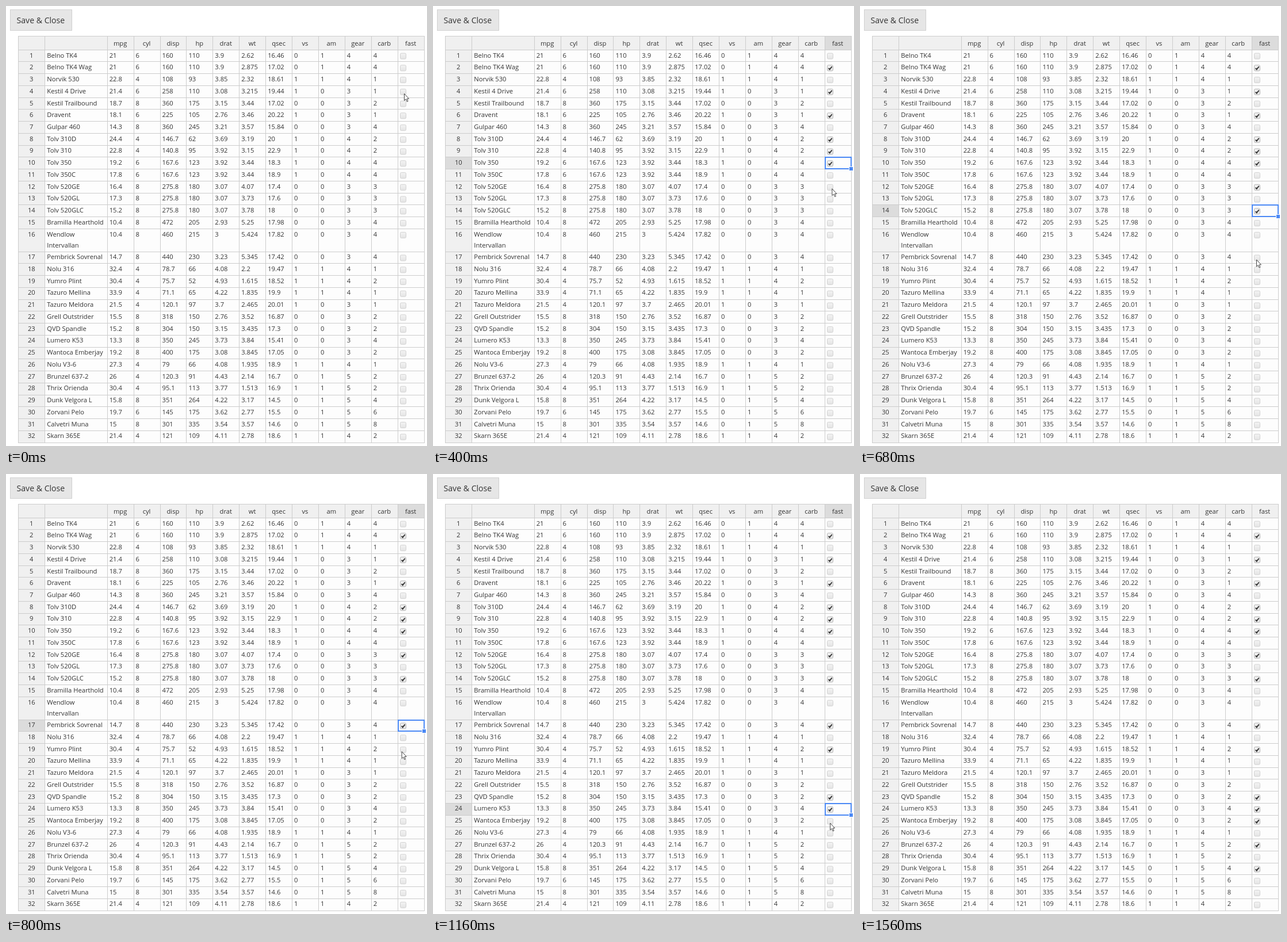
An HTML page with a canvas for the animation above (1640 ms loop, 732 by 765 pixels).

```html
<!DOCTYPE html>
<html lang="en">
<head>
<meta charset="utf-8">
<title>Editable table</title>
<style>
html, body { margin: 0; width: 100%; height: 100%; overflow: hidden; background: #fff; }
body { color: #333; font: 11.2px/18.9px "Open Sans", "Noto Sans", sans-serif; white-space: nowrap; }
canvas, table, .button { position: absolute; left: 0; top: 0; }
.button {
  left: 7px; top: 6px; width: 95.5px; height: 35px; padding-left: 10.5px;
  border: 1px solid #d0d0d0; background: #e6e6e6; font-size: 14.1px; line-height: 35px;
}
table { left: 21.3px; top: 52px; }
table, thead, tbody { display: block; }
tr { display: grid; grid-template-columns: 46px 108.4px repeat(12, 45.92px); }
thead tr { height: 23.7px; line-height: 25.3px; }
th { padding: 0; font-weight: normal; text-align: center; }
td { padding: .9px 0 .95px 4px; }
tbody tr { counter-increment: row; }
tbody tr::before { content: counter(row); padding-top: .9px; text-align: center; }
</style>
</head>
<body>
<canvas id="stage" width="732" height="765"></canvas>
<div class="button">Save &amp; Close</div>
<table>
<thead>
<tr><th><th><th>mpg<th>cyl<th>disp<th>hp<th>drat<th>wt<th>qsec<th>vs<th>am<th>gear<th>carb<th>fast
</thead>
<tbody>
<tr><td>Belno TK4<td>21<td>6<td>160<td>110<td>3.9<td>2.62<td>16.46<td>0<td>1<td>4<td>4
<tr><td>Belno TK4 Wag<td>21<td>6<td>160<td>110<td>3.9<td>2.875<td>17.02<td>0<td>1<td>4<td>4
<tr><td>Norvik 530<td>22.8<td>4<td>108<td>93<td>3.85<td>2.32<td>18.61<td>1<td>1<td>4<td>1
<tr><td>Kestil 4 Drive<td>21.4<td>6<td>258<td>110<td>3.08<td>3.215<td>19.44<td>1<td>0<td>3<td>1
<tr><td>Kestil Trailbound<td>18.7<td>8<td>360<td>175<td>3.15<td>3.44<td>17.02<td>0<td>0<td>3<td>2
<tr><td>Dravent<td>18.1<td>6<td>225<td>105<td>2.76<td>3.46<td>20.22<td>1<td>0<td>3<td>1
<tr><td>Gulpar 460<td>14.3<td>8<td>360<td>245<td>3.21<td>3.57<td>15.84<td>0<td>0<td>3<td>4
<tr><td>Tolv 310D<td>24.4<td>4<td>146.7<td>62<td>3.69<td>3.19<td>20<td>1<td>0<td>4<td>2
<tr><td>Tolv 310<td>22.8<td>4<td>140.8<td>95<td>3.92<td>3.15<td>22.9<td>1<td>0<td>4<td>2
<tr><td>Tolv 350<td>19.2<td>6<td>167.6<td>123<td>3.92<td>3.44<td>18.3<td>1<td>0<td>4<td>4
<tr><td>Tolv 350C<td>17.8<td>6<td>167.6<td>123<td>3.92<td>3.44<td>18.9<td>1<td>0<td>4<td>4
<tr><td>Tolv 520GE<td>16.4<td>8<td>275.8<td>180<td>3.07<td>4.07<td>17.4<td>0<td>0<td>3<td>3
<tr><td>Tolv 520GL<td>17.3<td>8<td>275.8<td>180<td>3.07<td>3.73<td>17.6<td>0<td>0<td>3<td>3
<tr><td>Tolv 520GLC<td>15.2<td>8<td>275.8<td>180<td>3.07<td>3.78<td>18<td>0<td>0<td>3<td>3
<tr><td>Bramilla Hearthold<td>10.4<td>8<td>472<td>205<td>2.93<td>5.25<td>17.98<td>0<td>0<td>3<td>4
<tr><td>Wendlow<br>Intervallan<td>10.4<td>8<td>460<td>215<td>3<td>5.424<td>17.82<td>0<td>0<td>3<td>4
<tr><td>Pembrick Sovrenal<td>14.7<td>8<td>440<td>230<td>3.23<td>5.345<td>17.42<td>0<td>0<td>3<td>4
<tr><td>Nolu 316<td>32.4<td>4<td>78.7<td>66<td>4.08<td>2.2<td>19.47<td>1<td>1<td>4<td>1
<tr><td>Yumro Plint<td>30.4<td>4<td>75.7<td>52<td>4.93<td>1.615<td>18.52<td>1<td>1<td>4<td>2
<tr><td>Tazuro Mellina<td>33.9<td>4<td>71.1<td>65<td>4.22<td>1.835<td>19.9<td>1<td>1<td>4<td>1
<tr><td>Tazuro Meldora<td>21.5<td>4<td>120.1<td>97<td>3.7<td>2.465<td>20.01<td>1<td>0<td>3<td>1
<tr><td>Grell Outstrider<td>15.5<td>8<td>318<td>150<td>2.76<td>3.52<td>16.87<td>0<td>0<td>3<td>2
<tr><td>QVD Spandle<td>15.2<td>8<td>304<td>150<td>3.15<td>3.435<td>17.3<td>0<td>0<td>3<td>2
<tr><td>Lumero K53<td>13.3<td>8<td>350<td>245<td>3.73<td>3.84<td>15.41<td>0<td>0<td>3<td>4
<tr><td>Wantoca Emberjay<td>19.2<td>8<td>400<td>175<td>3.08<td>3.845<td>17.05<td>0<td>0<td>3<td>2
<tr><td>Nolu V3-6<td>27.3<td>4<td>79<td>66<td>4.08<td>1.935<td>18.9<td>1<td>1<td>4<td>1
<tr><td>Brunzel 637-2<td>26<td>4<td>120.3<td>91<td>4.43<td>2.14<td>16.7<td>0<td>1<td>5<td>2
<tr><td>Thrix Orienda<td>30.4<td>4<td>95.1<td>113<td>3.77<td>1.513<td>16.9<td>1<td>1<td>5<td>2
<tr><td>Dunk Velgora L<td>15.8<td>8<td>351<td>264<td>4.22<td>3.17<td>14.5<td>0<td>1<td>5<td>4
<tr><td>Zorvani Pelo<td>19.7<td>6<td>145<td>175<td>3.62<td>2.77<td>15.5<td>0<td>1<td>5<td>6
<tr><td>Calvetri Muna<td>15<td>8<td>301<td>335<td>3.54<td>3.57<td>14.6<td>0<td>1<td>5<td>8
<tr><td>Skarn 365E<td>21.4<td>4<td>121<td>109<td>4.11<td>2.78<td>18.6<td>1<td>1<td>4<td>2
</tbody>
</table>
<script>
const ctx = document.getElementById('stage').getContext('2d');
const LOOP = 1640, STEP = 40, DESELECT = 1560;
const ROWS = 32, COLUMNS = 12, TALL_ROW = 16;

// Table geometry
const LEFT = 21, NAME = 67, TOP = 52, BODY = 75.7, ROW = 20.75, WRAP = 18.9;
const colX = k => Math.round(175.7 + 45.92 * k);
const rowY = n => BODY + (n - 1) * ROW + (n > TALL_ROW ? WRAP : 0);
const lineY = n => Math.round(rowY(n));
const RIGHT = colX(COLUMNS), BOTTOM = lineY(ROWS + 1), FAST = colX(COLUMNS - 1);

// Rows ticked from top to bottom, at a slowly falling pace
const tickedRows = [2, 4, 6, 8, 9, 10, 12, 14, 17, 19, 23, 24, 25, 27, 29];
const stops = [{ row: 4, time: 0 },
  ...tickedRows.map(row => ({ row, time: 30 * row + 0.72 * row * row }))];

function rect(x, y, x2, y2, color) {
  ctx.fillStyle = color;
  ctx.fillRect(x, y, x2 - x, y2 - y);
}

function drawGrid(selected) {
  const head = Math.round(BODY), line = '#ccc';
  rect(LEFT, TOP, RIGHT, BOTTOM, '#fdfdfd');
  rect(LEFT, TOP, RIGHT, head, '#f0f0f0');
  rect(LEFT, TOP, NAME, BOTTOM, '#f0f0f0');
  if (selected) {
    rect(FAST, TOP, RIGHT, head, '#dcdcdc');
    rect(LEFT, lineY(selected), NAME, lineY(selected + 1), '#dcdcdc');
  }
  const vertical = x => rect(x, TOP, x + 1, BOTTOM + 1, line);
  const horizontal = y => rect(LEFT, y, RIGHT + 1, y + 1, line);
  vertical(LEFT);
  vertical(NAME);
  for (let k = 0; k <= COLUMNS; k++) vertical(colX(k));
  horizontal(TOP);
  for (let n = 1; n <= ROWS + 1; n++) horizontal(lineY(n));
}

function drawCheckbox(n, checked) {
  ctx.save();
  ctx.translate(685.5, rowY(n) + 6.4);
  const fill = ctx.createLinearGradient(0, 0, 0, 10);
  fill.addColorStop(0, '#f3f3f3');
  fill.addColorStop(1, '#e4e4e4');
  ctx.beginPath();
  ctx.roundRect(0, 0, 10, 10, 2);
  ctx.fillStyle = fill;
  ctx.fill();
  ctx.strokeStyle = checked ? '#b4b4b4' : '#d2d2d2';
  ctx.stroke();
  if (checked) {
    ctx.lineWidth = 2;
    ctx.strokeStyle = '#333';
    ctx.stroke(new Path2D('M2.2 5.2L4.2 7.4L8.2 2.4'));
  }
  ctx.restore();
}

function drawSelection(n) {
  const y = lineY(n) + 1, y2 = lineY(n + 1), blue = '#4b89f5';
  ctx.lineWidth = 2;
  ctx.strokeStyle = blue;
  ctx.strokeRect(FAST + 1, y, RIGHT - FAST - 1, y2 - y);
  rect(RIGHT - 4, y2 - 4, RIGHT + 4, y2 + 4, '#fff');
  rect(RIGHT - 3, y2 - 3, RIGHT + 3, y2 + 3, blue);
}

// The pointer darts to the next row, rests there, and finally leaves to the right.
function pointerAt(t) {
  const next = stops.findIndex(s => s.time > t);
  const last = stops[stops.length - 1];
  const sway = 692 - t / 500 + 2.8 * Math.sin(t / 180);
  const hoverY = stop => rowY(stop.row) + 14;
  if (next < 0) return [sway + 1.2 * (t - last.time), hoverY(last)];
  const from = stops[next - 1], to = stops[next];
  const ease = 1 - (1 - (t - from.time) / (to.time - from.time)) ** 11;
  return [sway, hoverY(from) + (hoverY(to) - hoverY(from)) * ease];
}

function drawPointer(t) {
  const arrow = new Path2D('M.5 .5V12.4L3.2 10L5.2 14.4L7 13.6L5.1 9.3H8.5Z');
  ctx.save();
  ctx.translate(...pointerAt(t));
  ctx.fillStyle = '#fff';
  ctx.fill(arrow);
  ctx.lineWidth = 1;
  ctx.strokeStyle = '#444';
  ctx.stroke(arrow);
  ctx.restore();
}

function draw(t) {
  const done = stops.slice(1).filter(s => s.time <= t).map(s => s.row);
  const selected = t < DESELECT ? done[done.length - 1] : 0;
  ctx.clearRect(0, 0, 732, 765);
  ctx.lineWidth = 1;
  drawGrid(selected);
  for (let n = 1; n <= ROWS; n++) drawCheckbox(n, done.includes(n));
  if (selected) drawSelection(selected);
  drawPointer(t);
}

const start = performance.now();
function tick() {
  const t = (performance.now() - start) % LOOP;
  draw(Math.floor(t / STEP) * STEP);
  requestAnimationFrame(tick);
}
tick();
</script>
</body>
</html>
```
